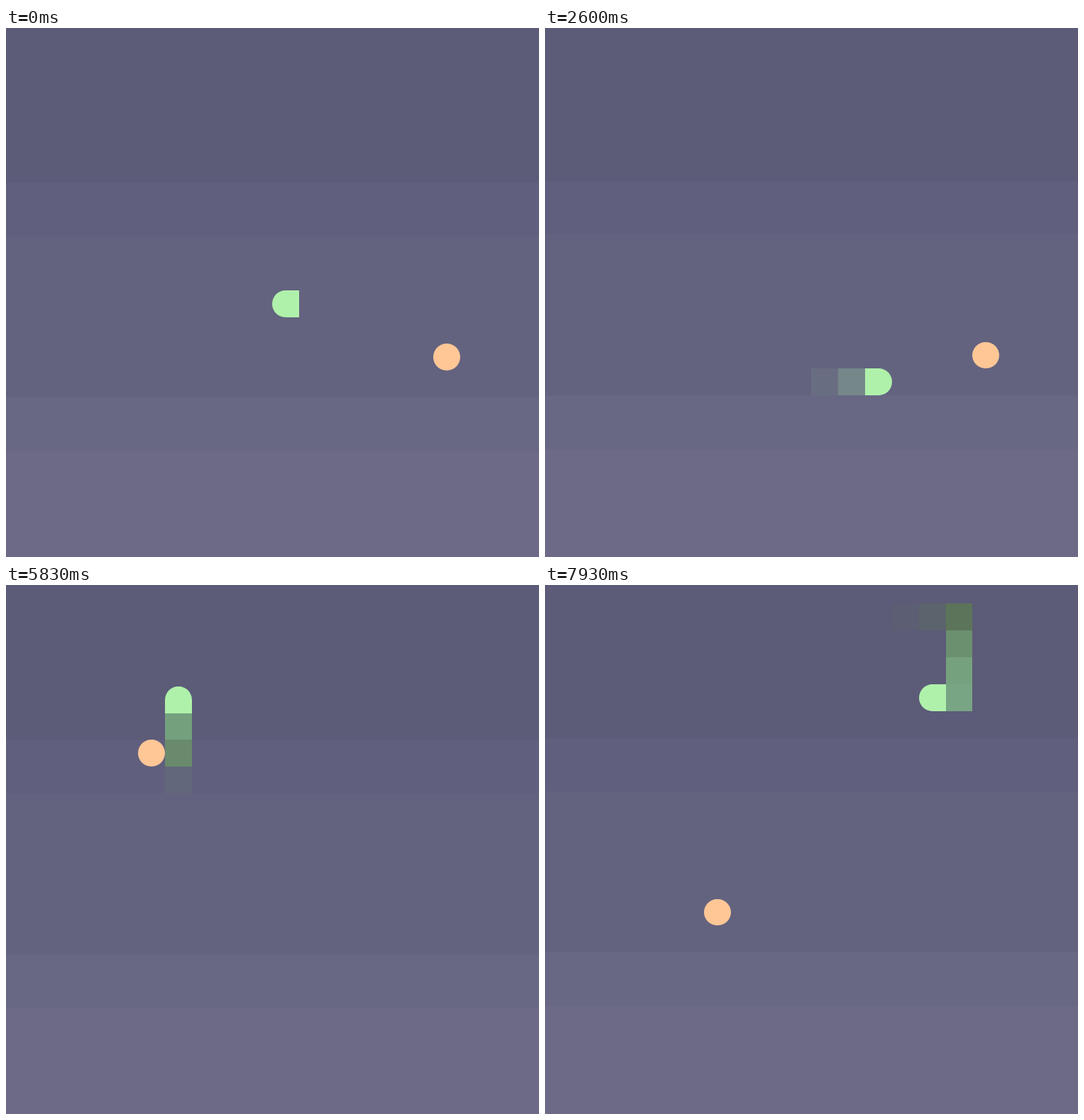
Write an HTML page with a canvas that moves like this. It is 751 px wide and 746 px high and loops after 8000 ms.

```html
<!DOCTYPE html>
<html lang="en">
<head>
<meta charset="utf-8">
<title>Snake</title>
<style>
  html, body { margin: 0; height: 100%; overflow: hidden; background: #6c6a87; }
  canvas { display: block; }
</style>
</head>
<body>
<canvas id="stage" width="751" height="746"></canvas>
<script>
const ctx = document.getElementById('stage').getContext('2d');

const LOOP = 8000, FIRST_STEP = 724, TICK = 91.2, FADE = 180;
const CELL = 37.83, LEFT = -2.9, TOP = -8.55, SCROLL = 2.9;
const HEAD = '#aff1ab', FOOD = '#ffc796';

// Bands as [first row, colour].
const BANDS = [[0, '#5c5b78'], [6, '#605f7d'], [8, '#64637f'], [14, '#686784'], [16, '#6c6a87']];

// Body colours from neck to tail, by number of body cells.
const SHADES = [
  [],
  ['#698d70'],
  ['#74a07e', '#698a6d'],
  ['#78a582', '#6c9272', '#596e59'],
  ['#78a583', '#76a17e', '#6b9070', '#5c7459']
];

const MOVES = 'L3 U5 R3 D8 R6 U3 L3 D2 R4 U4 L7 U1 L4 U4 L1 D3 R5 U5 R5 D3 L1';
const FOODS = [[16, 12], [17, 11], [5, 6], [13, 1], [6, 12]];
const DIRECTIONS = { L: [-1, 0], R: [1, 0], U: [0, -1], D: [0, 1] };

// One entry per step: position, heading, food eaten so far, page scrolled or not.
const steps = [{ x: 10, y: 10, dir: 'L', eaten: 0, scrolled: false }];
for (const [dir, ...count] of MOVES.split(' ')) {
  for (let i = 0; i < +count.join(''); i++) {
    const last = steps[steps.length - 1];
    const x = last.x + DIRECTIONS[dir][0], y = last.y + DIRECTIONS[dir][1];
    const [foodX, foodY] = FOODS[last.eaten];
    const ate = x === foodX && y === foodY;
    const scrolled = dir === 'D' || (dir !== 'U' && last.scrolled);
    steps.push({ x, y, dir, eaten: last.eaten + ate, scrolled });
  }
}
const lastStep = steps.length - 1;
const stepTime = n => FIRST_STEP + (n - 1) * TICK;

let scroll = 0;
const edgeX = col => Math.round(LEFT + col * CELL);
const edgeY = row => Math.round(TOP + row * CELL - scroll);

function drawCell(x, y, color, radii = 0, alpha = 1) {
  const left = edgeX(x), top = edgeY(y);
  ctx.globalAlpha = alpha;
  ctx.fillStyle = color;
  ctx.beginPath();
  ctx.roundRect(left, top, edgeX(x + 1) - left, edgeY(y + 1) - top, radii);
  ctx.fill();
  ctx.globalAlpha = 1;
}

function headRadii(dir) {
  const r = CELL / 2;
  return { L: [r, 0, 0, r], R: [0, r, r, 0], U: [r, r, 0, 0], D: [0, 0, r, r] }[dir];
}

function drawBackground() {
  for (const [row, color] of BANDS) {
    ctx.fillStyle = color;
    const top = row ? edgeY(row) : 0;
    ctx.fillRect(0, top, 751, 746 - top);
  }
}

function drawTrail(current, t) {
  for (let n = Math.max(1, current - 3); n <= current; n++) {
    const { eaten } = steps[n];
    if (eaten > steps[n - 1].eaten) continue;
    const age = t - stepTime(n);
    if (age >= FADE) continue;
    const cell = steps[n - eaten - 1];
    drawCell(cell.x, cell.y, SHADES[eaten][eaten - 1] || HEAD, 0, 0.35 * (1 - age / FADE));
  }
}

function draw(t) {
  const current = Math.min(lastStep, Math.max(0, Math.floor((t - FIRST_STEP) / TICK) + 1));
  const head = steps[current];
  // The key for the next move scrolls the page before the head turns.
  scroll = steps[Math.min(lastStep, current + 1)].scrolled ? SCROLL : 0;

  drawBackground();
  drawTrail(current, t);
  SHADES[head.eaten].forEach((color, i) => {
    const cell = steps[current - i - 1];
    drawCell(cell.x, cell.y, color);
  });
  drawCell(...FOODS[head.eaten], FOOD, CELL / 2);
  drawCell(head.x, head.y, HEAD, headRadii(head.dir));
}

const start = performance.now();
function frame() {
  draw((performance.now() - start) % LOOP);
  requestAnimationFrame(frame);
}
frame();
</script>
</body>
</html>
```
